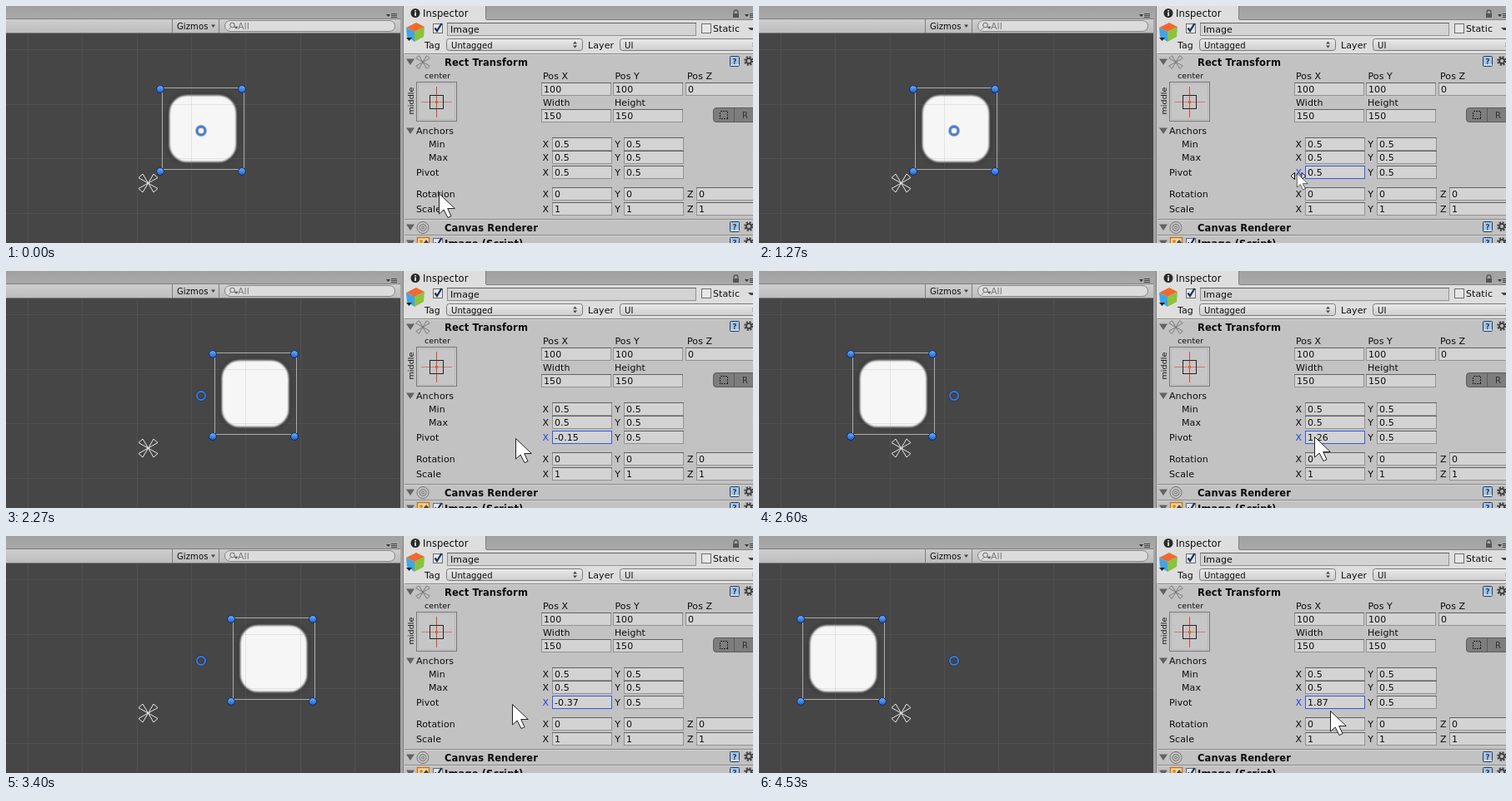
These frames come from a looping animation (896x285 px, 4730 ms). An HTML page:

```html
<!DOCTYPE html>
<html lang="en">
<head>
<meta charset="utf-8">
<title>Pivot drag</title>
<style>
  html, body { margin: 0; width: 100%; height: 100%; overflow: hidden; background: #c2c2c2; }
  svg { display: block; width: 896px; height: 285px; }
  text { font: 11px "DejaVu Sans", Verdana, sans-serif; letter-spacing: .1px; fill: #0c0c0c; white-space: pre; }
  .bold { font-weight: bold; font-size: 11.5px; }
  .small { font-size: 9.5px; }
  .mid { font-size: 10px; }
  .crisp { shape-rendering: crispEdges; }
</style>
</head>
<body>
<svg viewBox="0 0 896 285" xmlns="http://www.w3.org/2000/svg">
  <defs>
    <linearGradient id="bar" x2="0" y2="1"><stop stop-color="#cfcfcf"/><stop offset="1" stop-color="#bcbcbc"/></linearGradient>
    <linearGradient id="tabs" x2="0" y2="1"><stop stop-color="#a0a0a0"/><stop offset="1" stop-color="#a9a9a9"/></linearGradient>
    <linearGradient id="drop" x2="0" y2="1"><stop stop-color="#eaeaea"/><stop offset="1" stop-color="#cecece"/></linearGradient>
    <linearGradient id="dot" x2="0" y2="1"><stop stop-color="#6fb0ff"/><stop offset="1" stop-color="#1b5fd0"/></linearGradient>
    <filter id="soft" x="-20%" y="-20%" width="140%" height="140%"><feGaussianBlur stdDeviation="1.3"/></filter>
    <filter id="shade" x="-20%" y="-20%" width="140%" height="140%"><feGaussianBlur stdDeviation="2"/></filter>
    <clipPath id="view"><rect y="33" width="473" height="252"/></clipPath>
    <path id="petals" fill="none" d="M0 0L-11.500-6.500L-6.500-11ZM0 0L11.500-6.500L6.500-11ZM0 0L-11.500 6.500L-6.500 11ZM0 0L11.500 6.500L6.500 11Z"/>
    <path id="fold" d="M-5-3.500H5L0 4Z" fill="#636363"/>
    <g id="menu"><path d="M0-1h5l-2.500 3z" fill="#333"/><path d="M6-1.500h7M6 .5h7M6 2.500h7" stroke="#444"/></g>
    <g id="check">
      <rect x=".5" y=".5" width="11" height="11" fill="#e6e6e6" stroke="#6d6d6d"/>
      <path d="M2.500 5.500L5 9L10.500 0" fill="none" stroke="#16305f" stroke-width="2.200"/>
    </g>
    <g id="help">
      <rect x=".5" y=".5" width="11" height="12" rx="1" fill="#a9c2e2" stroke="#23405f"/>
      <path d="M2 11h9.500" stroke="#f4f8fc"/>
      <text x="3.500" y="9.500" style="font:bold 8.500px 'DejaVu Sans',sans-serif;fill:#1d3b66">?</text>
    </g>
    <g id="gear" fill="none" stroke="#444">
      <circle r="4.600" stroke-width="2.600" stroke-dasharray="2 1.600"/><circle r="3" stroke-width="2"/>
    </g>
    <path id="arrow" d="M.5.500V25L6.200 20L11 29.500L15 27.700L10.700 18.500H19.300Z" fill="#fff" stroke="#222" stroke-linejoin="round"/>
  </defs>

  <!-- scene view -->
  <rect width="473" height="285" fill="#464646"/>
  <g clip-path="url(#view)">
    <g id="sprite">
      <rect x="7.500" y="106" width="83" height="83" rx="22" fill="#222" opacity=".5" filter="url(#shade)"/>
      <rect x="9" y="107.500" width="80" height="80" rx="21" fill="#f6f6f6" filter="url(#soft)"/>
    </g>
    <g id="grid" class="crisp" stroke="#808080" stroke-opacity=".17"></g>
    <use href="#petals" x="170.500" y="213" stroke="#e8e8e8"/>
    <g id="frame">
      <rect class="crisp" x=".5" y="98.500" width="98" height="98" fill="none" stroke="#acacac"/>
      <g id="handles" fill="url(#dot)" stroke="#0c2c66"></g>
    </g>
    <circle cx="234" cy="150" r="5" fill="none" stroke="#12305f" stroke-width="3.800" opacity=".45"/>
    <circle cx="234" cy="150" r="5" fill="none" stroke="#3b7be0" stroke-width="1.900"/>
  </g>
  <rect width="473" height="15" fill="url(#tabs)"/>
  <rect y="15" width="473" height="18" fill="url(#bar)"/>
  <path class="crisp" d="M0 15.500H473M0 32.500H473M199.500 16V32M255.500 16V32" stroke="#7e7e7e"/>
  <text class="mid" x="205" y="28">Gizmos</text>
  <path d="M246 22.500h5l-2.500 3.500z" fill="#444"/>
  <rect x="262.500" y="17.500" width="204" height="13" rx="6.500" fill="#dcdcdc" stroke="#858585"/>
  <path d="M270 25.500l-3 3M274 25h4l-2 2.500z" stroke="#666" fill="#666" stroke-width=".8"/>
  <circle cx="271.500" cy="23" r="2.800" fill="none" stroke="#666"/>
  <text x="278" y="27.500" style="fill:#777">All</text>
  <use href="#menu" x="456" y="11"/>

  <!-- inspector -->
  <rect x="473" width="4" height="285" fill="#a4a4a4"/>
  <rect x="477" width="419" height="285" fill="#c2c2c2"/>
  <rect x="477" width="419" height="57" fill="#dedede"/>
  <rect x="575" width="321" height="16" fill="url(#tabs)"/>
  <path class="crisp" d="M476.500 0V285M575.500 0V16M576 16.500H896" stroke="#808080"/>
  <circle cx="491" cy="8.500" r="5.500" fill="#2b2b2b"/>
  <path d="M491 7.500V12M491 5v1.500" stroke="#fff" stroke-width="1.600"/>
  <text x="500" y="13" style="font-size:11.500px">Inspector</text>
  <path d="M873 9V7.500a2.500 2.500 0 0 1 5 0V9" fill="none" stroke="#555" stroke-width="1.300"/>
  <rect x="872" y="9" width="7" height="5" fill="#555"/>
  <use href="#menu" x="886" y="11"/>

  <path d="M480 26L492 20L502 25L490 31Z" fill="#ef6a2f"/>
  <path d="M480 26L490 31V43L481 37Z" fill="#3fa4e8"/>
  <path d="M490 31L502 25L501 37L490 43Z" fill="#8cc23c"/>
  <path d="M480 38h7l-3.500 4z" fill="#222"/>
  <use href="#check" x="512" y="21"/>
  <rect x="834.500" y="21.500" width="11" height="11" fill="#e6e6e6" stroke="#6d6d6d"/>
  <path d="M890 26h6v3h-3z" fill="#444"/>
  <g id="panel"></g>

  <!-- anchor preset -->
  <rect class="crisp" x="492.500" y="91.500" width="48" height="47" fill="#c8c8c8" stroke="#777"/>
  <rect class="crisp" x="494.500" y="93.500" width="44" height="43" fill="#c6c6c6" stroke="#b8b8b8"/>
  <path class="crisp" d="M516.500 97V134" stroke="#d2483c"/>
  <path class="crisp" d="M498 115.500H535" stroke="#d2483c" stroke-opacity=".6"/>
  <rect class="crisp" x="508.500" y="107.500" width="16" height="16" fill="none" stroke="#222"/>
  <rect x="515" y="114" width="3" height="3" fill="#d86a18"/>
  <text class="small" x="502" y="87">center</text>
  <text class="small" transform="translate(488.500 130.500) rotate(-90)">middle</text>

  <!-- blueprint and raw buttons -->
  <path d="M896 122.500H852a3.500 3.500 0 0 0-3.500 3.500V136a3.500 3.500 0 0 0 3.500 3.500H896" fill="#7d7d7d" stroke="#5c5c5c"/>
  <path class="crisp" d="M873.500 123V139" stroke="#5c5c5c"/>
  <rect class="crisp" x="856.500" y="126.500" width="9" height="9" fill="none" stroke="#222" stroke-dasharray="2 1"/>
  <text class="mid" x="883" y="135" style="fill:#333">R</text>

  <use href="#petals" stroke="#777" stroke-width="1.300" transform="translate(500 67.500) scale(.72)"/>
  <g fill="none" stroke="#777"><circle cx="500" cy="266.500" r="7"/><circle cx="500" cy="266.500" r="4"/><circle cx="500" cy="266.500" r="1.500"/></g>
  <rect x="493.500" y="278.500" width="14" height="12" fill="#f3d9a0" stroke="#c87820" stroke-width="1.500"/>
  <circle cx="498" cy="283" r="2" fill="#e08a1e"/>
  <path d="M500 286l4-5 4 5z" fill="#444"/>
  <use href="#check" x="512" y="279"/>

  <g id="pointer">
    <use id="big" href="#arrow"/>
    <g id="small">
      <path d="M-7 3.500L-2.500-.5V7.500ZM10.500 3.500L6-.5V7.500Z" fill="#fff" stroke="#000"/>
      <use href="#arrow" transform="scale(.68)"/>
    </g>
  </g>
</svg>
<script>
const NS = "http://www.w3.org/2000/svg";
const $ = id => document.getElementById(id);
const panel = $("panel");

function add(parent, tag, attrs, content = "") {
  const el = parent.appendChild(document.createElementNS(NS, tag));
  for (const k in attrs) el.setAttribute(k, attrs[k]);
  el.textContent = content;
  return el;
}
const line = (parent, d, stroke) => add(parent, "path", { d, ...(stroke && { stroke }), class: "crisp" });
const label = (x, y, s, cls = "") => add(panel, "text", { x, y, class: cls }, s);

function field(x, y, w, value) {
  const box = add(panel, "rect", { x: x + .5, y: y + .5, width: w - 1, height: 15, fill: "#d3d3d3", stroke: "#929292", class: "crisp" });
  const edge = line(panel, `M${x} ${y + .5}h${w}`, "#626262");
  return { box, edge, text: label(x + 3, y + 12, value) };
}

function popup(x, w, value) {
  add(panel, "rect", { x: x + .5, y: 39.5, width: w, height: 14, rx: 3, fill: "url(#drop)", stroke: "#7a7a7a" });
  label(x + 6, 50.5, value, "mid");
  add(panel, "path", { d: `M${x + w - 11} 45.500h5l-2.500-3zm0 2h5l-2.500 3z`, fill: "#444" });
}

function row(y, values) {
  return values.map((v, i) => {
    const x = 643.5 + 86.7 * i;
    return { name: label(x, y + 12, "XYZ"[i]), ...field(Math.round(x + 11.2), y, 72, v) };
  });
}

function header(y, title) {
  line(panel, `M478 ${y - 9.5}H896`, "#8a8a8a");
  line(panel, `M478 ${y - 8.5}H896`, "#d2d2d2");
  add(panel, "use", { href: "#fold", x: 485, y });
  label(526, y + 4.5, title, "bold");
  add(panel, "use", { href: "#help", x: 868, y: y - 7 });
  add(panel, "use", { href: "#gear", x: 891, y: y - 1 });
}

for (let k = 0; k < 7; k++) line($("grid"), `M${Math.round(26 + 65.3 * k) + .5} 33V285`);
for (let k = 0; k < 4; k++) line($("grid"), `M0 ${Math.round(52 + 65.5 * k) + .5}H473`);
for (const cx of [-2, 96]) for (const cy of [100, 199]) add($("handles"), "circle", { cx, cy, r: 4.4 });

field(529, 20, 299, "Image").text.setAttribute("x", 533);
label(848, 31, "Static");
label(502, 51, "Tag");
label(698, 51, "Layer");
popup(528, 163, "Untagged");
popup(736, 170, "UI");
header(67, "Rect Transform");
["Pos X", "Pos Y", "Pos Z"].forEach((s, i) => {
  label(644 + 86.5 * i, 88, s);
  field([642, 728, 815][i], 92, 84, [100, 100, 0][i]);
});
["Width", "Height"].forEach((s, i) => {
  label(644 + 86 * i, 120, s);
  field(642 + 86 * i, 124, 84, 150);
});
add(panel, "use", { href: "#fold", x: 485, y: 150 });
[["Anchors", 492, 154], ["Min", 507, 170], ["Max", 507, 186], ["Pivot", 492, 204], ["Rotation", 492, 230], ["Scale", 492, 248]]
  .forEach(([s, x, y]) => label(x, y, s));
row(158, [.5, .5]);
row(174, [.5, .5]);
const [pivotX] = row(192, [.5, .5]);
row(218, [0, 0, 0]);
row(236, [1, 1, 1]);
header(266, "Canvas Renderer");
header(285, "Image (Script)");

// Keys: time, then values
const pointerKeys = [
  [0, 519, 225], [130, 518, 225], [200, 518, 225], [330, 513, 224], [600, 615, 171], [730, 637, 183],
  [800, 651, 195], [870, 641, 203], [930, 645, 201], [1330, 645, 201], [1730, 624, 204], [1870, 612, 204],
  [2060, 597, 203], [2270, 611, 201], [2600, 666, 199], [2800, 679, 200], [3400, 607, 202],
  [3600, 594, 201], [3870, 632, 202], [4330, 684, 210], [4470, 684, 210], [4530, 685, 210]
];
const pivotKeys = [
  [0, .5], [1335, .5], [1730, .05], [1870, -.36], [2060, -.66], [2600, 1.26], [2800, 1.71],
  [3400, -.37], [3600, -.755], [3870, .11], [4330, 1.87]
];

// Monotone cubic interpolation: flat at turning points, no overshoot
function at(keys, t, c) {
  const last = keys.length - 1;
  if (t >= keys[last][0]) return keys[last][c];
  const i = keys.findIndex(k => k[0] > t) - 1;
  const secant = j => (keys[j + 1][c] - keys[j][c]) / (keys[j + 1][0] - keys[j][0]);
  const slope = j => {
    if (j === 0 || j === last) return 0;
    const a = secant(j - 1), b = secant(j);
    return a * b > 0 ? 2 * a * b / (a + b) : 0;
  };
  const h = keys[i + 1][0] - keys[i][0], u = (t - keys[i][0]) / h, v = 1 - u;
  return keys[i][c] * v * v * (1 + 2 * u) + keys[i + 1][c] * u * u * (3 - 2 * u)
    + h * u * v * (slope(i) * v - slope(i + 1) * u);
}

const LOOP = 4730;
const move = (el, x, y) => el.setAttribute("transform", `translate(${x} ${y})`);
const show = (el, on) => el.setAttribute("visibility", on ? "visible" : "hidden");

function draw(ms) {
  const tick = Math.floor((ms + 3.5) * .015);
  const t = Math.round(tick * 100 / 15) * 10;

  const pivot = Math.round(at(pivotKeys, t, 1) * 100) / 100;
  const left = Math.floor(234 - 98 * pivot) + 2;
  move($("sprite"), left, 0);
  move($("frame"), left, 0);

  const focus = t >= 1270;
  pivotX.text.textContent = pivot;
  pivotX.name.style.fill = focus ? "#1f45e0" : "";
  pivotX.box.setAttribute("stroke", focus ? "#3a58e6" : "#929292");
  pivotX.edge.setAttribute("stroke", focus ? "#3a58e6" : "#626262");

  const overLabel = t >= 800 && t < 1400;
  show($("small"), overLabel);
  show($("big"), !overLabel);
  move($("pointer"), Math.round(at(pointerKeys, t, 1)), Math.round(at(pointerKeys, t, 2)));
}

const start = performance.now();
function loop() {
  draw((performance.now() - start) % LOOP);
  requestAnimationFrame(loop);
}
loop();
</script>
</body>
</html>
```
